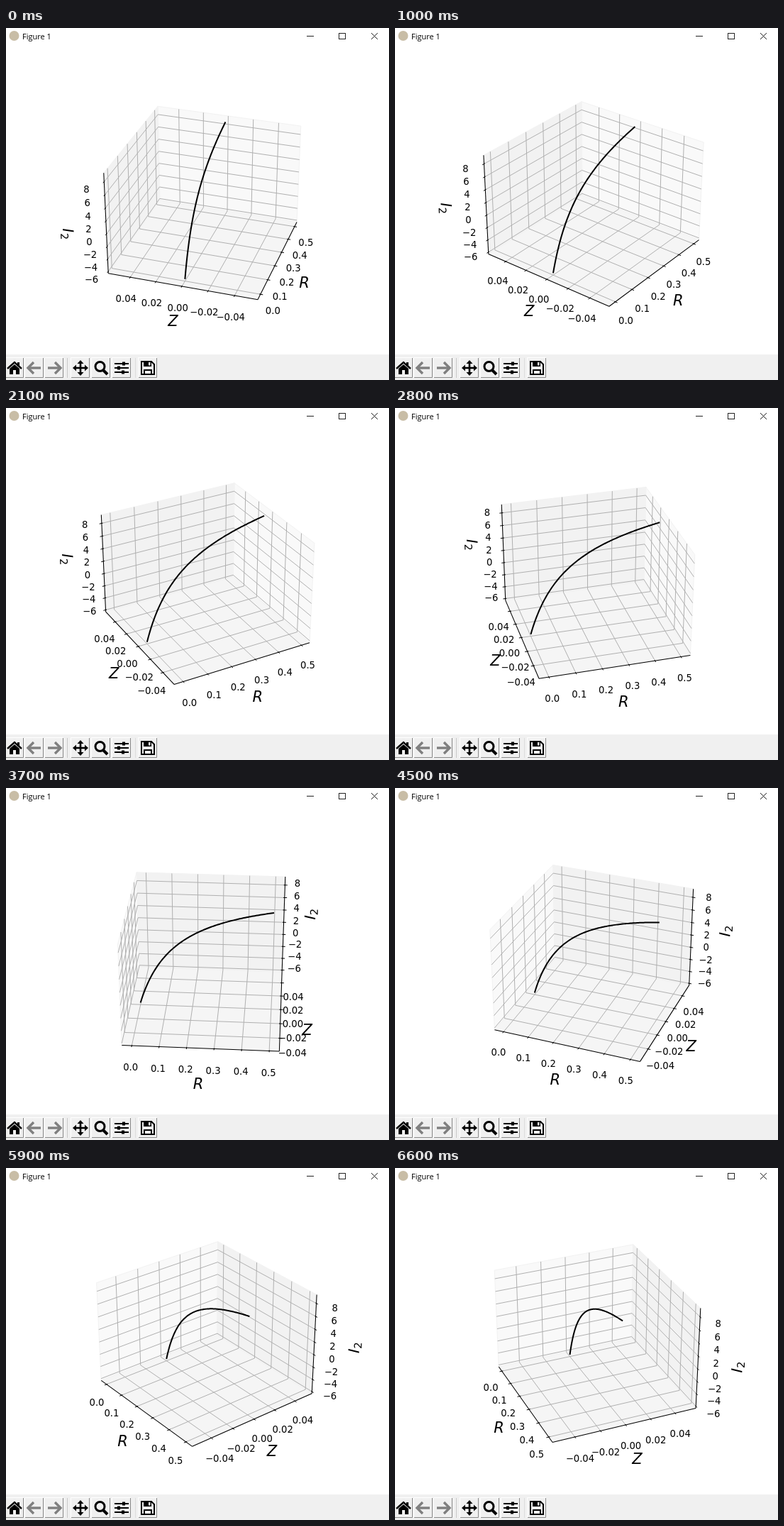
Animation, 540 px wide and 496 px high, one loop 6.7 s. Source, as an HTML page with a canvas:

```html
<!DOCTYPE html>
<html>
<head>
<meta charset="utf-8">
<style>
html, body { margin: 0; width: 100%; height: 100%; overflow: hidden; background: #fff; }
canvas { display: block; }
</style>
</head>
<body>
<canvas id="stage" width="540" height="496"></canvas>
<script>
const g = document.getElementById('stage').getContext('2d');
const LOOP = 6700, STEP = 100, ELEV = Math.PI / 6, DIST = 10;
const FONT = '"DejaVu Sans", sans-serif';

// Camera azimuth in degrees at given times
const TURN = [[0, -162.4], [1000, -142.3], [2100, -118.9], [2800, -105.5],
  [3700, -86.1], [5200, -53.3], [6600, -23.2]];

const AXES = [
  { name: 'R', lo: -0.025, hi: 0.525, size: 8 / 7, from: 0, step: 0.1, count: 6, digits: 1 },
  { name: 'Z', lo: -0.055, hi: 0.055, size: 8 / 7, from: -0.04, step: 0.02, count: 5, digits: 2 },
  { name: 'I', lo: -6, hi: 9, size: 6 / 7, from: -6, step: 2, count: 8, digits: 0 }
];
const PANES = ['#f9f9f9', '#f2f2f2', '#f5f5f5'];
const half = AXES.map(a => a.size * 25 / 48);
const world = (i, v) => ((v - AXES[i].lo) / (AXES[i].hi - AXES[i].lo) - 0.5) * AXES[i].size;

let sinA, cosA;

function azimuth(t) {
  const k = Math.max(1, TURN.findIndex(p => p[0] >= t));
  const [t0, a0] = TURN[k - 1], [t1, a1] = TURN[k];
  return a0 + (a1 - a0) * (t - t0) / (t1 - t0);
}

function project([x, y, z]) {
  const near = x * cosA + y * sinA;
  const depth = DIST - near * Math.cos(ELEV) - z * Math.sin(ELEV);
  const up = z * Math.cos(ELEV) - near * Math.sin(ELEV);
  return [281.5 + 1816 * (y * cosA - x * sinA) / depth, 240.8 - 1789 * up / depth];
}

function path(points, color, width, fill) {
  g.beginPath();
  points.forEach(p => g.lineTo(p[0], p[1]));
  if (fill) {
    g.closePath();
    g.fillStyle = fill;
    g.fill();
  }
  if (color) {
    g.strokeStyle = color;
    g.lineWidth = width;
    g.stroke();
  }
}

const line = (points, color, width) => path(points.map(project), color, width);
const put = (p, i, v) => p.map((c, k) => k === i ? v : c);

function text(s, x, y, size, style = '', align = 'center') {
  g.font = `${style} ${size}px ${FONT}`;
  g.textAlign = align;
  g.fillStyle = '#000';
  g.fillText(s, x, y + size * 0.365);
}

function drawAxis(i, far) {
  const axis = AXES[i], corner = far.map((s, k) => s * half[k]);
  const side = i === 0 ? 1 : 0;            // direction the ticks point in
  const edge = put(corner, side, -corner[side]);
  const outward = edge.map((c, k) => k === i ? 0 : Math.sign(c));
  const shift = (p, d) => p.map((c, k) => c + outward[k] * d[k]);

  for (let n = 0; n < axis.count; n++) {
    const w = world(i, axis.from + n * axis.step), at = put(corner, i, w);
    const [u, v] = [0, 1, 2].filter(k => k !== i);
    line([put(at, u, -at[u]), at, put(at, v, -at[v])], '#b0b0b0', 1);
  }

  const ends = [put(edge, i, -half[i]), put(edge, i, half[i])];
  line(ends, '#000', 1.05);

  for (let n = 0; n < axis.count; n++) {
    const value = axis.from + n * axis.step;
    const at = put(edge, i, world(i, value)), unit = AXES[side].size / 12;
    line([-0.1, 0.2].map(f => put(at, side, at[side] + outward[side] * f * unit)), '#000', 1);
    const [x, y] = project(shift(at, [0.0988, 0.0988, 0.0988]));
    const label = Math.abs(value).toFixed(axis.digits);
    text((value < -1e-9 ? '\u2212' : '') + label, x, y + 4.9, 13.2);
  }

  const [x, y] = project(shift(put(edge, i, 0), [0.2148, 0.2148, 0.161]));
  if (i < 2) return text(axis.name, x, y + 2.5, 21, 'oblique');
  const [a, b] = ends.map(project);
  g.save();
  g.translate(x, y);
  g.rotate(Math.atan((b[1] - a[1]) / (b[0] - a[0])));
  text('I', -8, 0, 21, 'oblique', 'left');
  text('2', -1.5, 5.5, 14.7, '', 'left');
  g.restore();
}

function drawPlot(t) {
  const a = azimuth(t) * Math.PI / 180;
  sinA = Math.sin(a);
  cosA = Math.cos(a);
  const far = [-Math.sign(cosA), -Math.sign(sinA), -1];

  for (let i = 0; i < 3; i++) {
    const [u, v] = [0, 1, 2].filter(k => k !== i);
    const quad = [[-1, -1], [1, -1], [1, 1], [-1, 1]].map(([p, q]) => {
      const c = [0, 0, 0];
      c[i] = far[i] * half[i];
      c[u] = p * half[u];
      c[v] = q * half[v];
      return project(c);
    });
    path([...quad, quad[0]], '#f2f2f2', 1, PANES[i]);
  }
  for (let i = 0; i < 3; i++) drawAxis(i, far);

  const curve = [];
  for (let n = 0; n <= 100; n++) {
    const r = n / 200;
    curve.push([world(0, r), 0, world(2, -6 + 19.5 * r / (r + 0.15))]);
  }
  line(curve, '#000', 2);
}

function drawTitleBar() {
  g.fillStyle = '#c8bda6';
  g.beginPath();
  g.arc(11.5, 11, 7, 0, 7);
  g.fill();
  g.font = '11px "Open Sans", "Noto Sans", sans-serif';
  g.textAlign = 'left';
  g.fillStyle = '#000';
  g.fillText('Figure 1', 23, 15.5);
  path([[424, 11.5], [434, 11.5]], '#222', 1);
  g.strokeRect(469.5, 7.5, 9, 8);
  path([[515, 7], [524, 16]], '#222', 1);
  path([[524, 7], [515, 16]], '#222', 1);
}

// Icons are drawn around their own centre
function arrow(dir) {
  const s = x => x * dir;
  path([[s(-9), 0], [s(9), 0]].slice(0, 2), '#7f7f7f', 3.4);
  path([[s(1), -8], [s(9), 0], [s(1), 8]], '#7f7f7f', 3.4);
}

function home() {
  path([[-10, 1], [0, -8], [10, 1]], '#000', 2.4);
  path([[-7, 1], [0, -5], [7, 1], [7, 9], [2, 9], [2, 3], [-2, 3], [-2, 9], [-7, 9]], null, 0, '#000');
  g.fillRect(4, -8, 3, 6);
}

function pan() {
  for (let k = 0; k < 4; k++) {
    path([[0, 0], [0, -8]], '#000', 2.6);
    path([[0, -11], [4.5, -6], [-4.5, -6]], null, 0, '#000');
    g.rotate(Math.PI / 2);
  }
}

function zoom() {
  path([[3, 3], [9, 9]], '#000', 4);
  g.lineWidth = 3;
  g.beginPath();
  g.arc(-1.5, -2, 6.5, 0, 7);
  g.stroke();
}

function sliders() {
  [[-6, 3], [0, -4], [6, 2]].forEach(([y, x]) => {
    path([[-10, y], [10, y]], '#000', 2);
    g.fillStyle = '#000';
    g.fillRect(x - 2, y - 2.5, 4, 5);
  });
}

function save() {
  path([[-9, -9], [5, -9], [9, -5], [9, 9], [-9, 9], [-9, -9]], '#000', 2, '#f0f0f0');
  g.fillStyle = '#000';
  g.fillRect(-6, -9, 11, 7);
  g.fillRect(-6, 2, 12, 7);
  g.fillStyle = '#f0f0f0';
  g.fillRect(1, -8, 2.5, 4.5);
  g.fillRect(-4, 4, 8, 4);
}

function drawToolbar() {
  g.fillStyle = '#f0f0f0';
  g.fillRect(0, 460, 540, 36);
  path([[86.5, 465], [86.5, 493]], '#c8c8c8', 1);
  path([[182.5, 465], [182.5, 493]], '#dcdcdc', 1);
  const buttons = [[12, home], [40, () => arrow(-1)], [68, () => arrow(1)],
    [105, pan], [134, zoom], [163, sliders], [200, save]];
  for (const [x, icon] of buttons) {
    path([[x - 13.5, 493], [x - 13.5, 464.5], [x + 13, 464.5]], '#fff', 1);
    path([[x - 13, 492.5], [x + 12.5, 492.5], [x + 12.5, 465]], '#8a8a8a', 1);
    g.save();
    g.translate(x, 479);
    icon();
    g.restore();
  }
}

function draw() {
  const t = Math.floor(performance.now() % LOOP / STEP) * STEP;
  g.fillStyle = '#fff';
  g.fillRect(0, 0, 540, 496);
  drawPlot(t);
  drawTitleBar();
  drawToolbar();
  requestAnimationFrame(draw);
}
draw();
</script>
</body>
</html>
```
